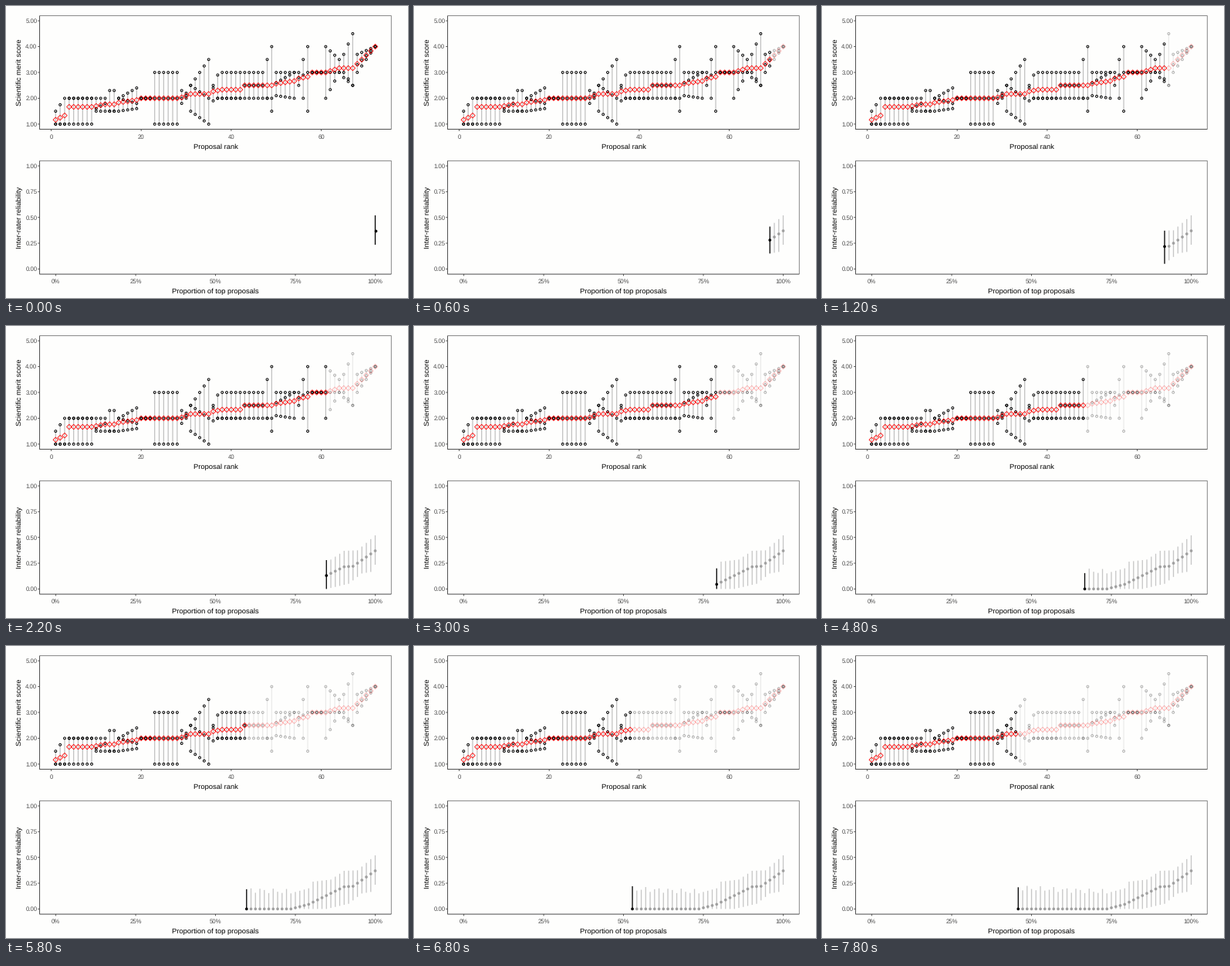
Write a matplotlib script that moves like this. It is 521 px wide and 378 px high and loops after 8000 ms.

```python
import numpy as np
import matplotlib.pyplot as plt
from matplotlib.animation import FuncAnimation
from matplotlib.collections import LineCollection

W, H, DPI = 521, 378, 100
PX = 72 / DPI                       # points per pixel
LEFT, RIGHT = 43.6, 499.3
STEPS, FADE = 40, 0.3
TICK, TITLE = 7.8, 9.35             # text sizes in pixels

plt.rcParams.update({"font.family": "Liberation Sans",
                     "text.hinting": "none"})


def run(count, first, last=None):
    """Score triples drifting evenly from first to last."""
    return np.linspace(first, first if last is None else last, count)


# Low, middle and high reviewer score of each proposal, in rank order.
scores = np.vstack([
    run(3, (1, 1, 1.5), (1, 1, 2)),
    run(6, (1, 2, 2)),
    run(3, (1.5, 1.6, 2), (1.5, 1.8, 2)),
    run(2, (1.5, 1.5, 2.3)),
    run(5, (1.5, 2, 2), (1.6, 1.8, 2.4)),
    run(3, (2, 2, 2)),
    run(6, (1, 2, 3)),
    run(2, (1.8, 2, 2.3), (2, 2.1, 2.2)),
    run(5, (1.5, 2.5, 2.5), (1, 2, 3.5)),
    run(2, (1.9, 2.4, 2.5), (2, 2, 2.9)),
    run(5, (2, 2, 3)),
    run(5, (2, 2.5, 3)),
    run(2, (2, 2, 3.5), (1.5, 2, 4)),
    run(5, (2.1, 2.6, 3), (2, 3, 3)),
    run(3, (2.5, 2.8, 3), (1.5, 3, 4)),
    run(3, (3, 3, 3)),
    run(4, (2, 3, 4), (3, 3, 3.5)),
    run(3, (2.8, 3, 3.7), (2.5, 2.5, 4.5)),
    run(5, (3, 3.3, 3.7), (4, 4, 4)),
])
count = len(scores)
ranks = np.arange(1, count + 1)

# Reliability falls to zero as the best-ranked proposals are dropped.
steps = np.arange(STEPS)
estimate = np.interp(steps, [0, 5, 7, 15, 19], [.37, .22, .215, .045, 0])
lower = np.interp(steps, [0, 1, 3, 6, 11], [.235, .165, .15, .05, 0])
upper = np.interp(steps, [0, 4, 7, 10, 14, 15, 18, 39],
                  [.52, .375, .37, .285, .265, .2, .165, .205])
ripple = .025 * np.cos(2 * np.pi * (steps - 20) / 2.8)
upper += np.where(steps > 18, ripple, 0)


def rank_x(rank):
    return 58.5 + 5.834 * rank


def score_y(score):
    return 152.9 - 33.45 * (score - 1)


def share_x(share):
    return 64.6 + 413.9 * share


def rel_y(value):
    return 340.4 - 133.4 * value


fig = plt.figure(figsize=(W / DPI, H / DPI), dpi=DPI, facecolor="#fefefd")
ax = fig.add_axes([0, 0, 1, 1])
ax.set_xlim(0, W)
ax.set_ylim(H, 0)
ax.axis("off")


def line(xs, ys, color, width=0.9):
    ax.plot(xs, ys, color=color, lw=width * PX, zorder=6, snap=False,
            solid_capstyle="butt")


def label(x, y, text, size, color="black", **kw):
    ax.text(x, y, text, fontsize=size * PX, color=color, va="baseline", **kw)


def panel(y0, y1, xticks, yticks, xtitle, ytitle):
    line([LEFT, RIGHT, RIGHT], [y0, y0, y1], "#7a7a7a")
    line([LEFT, LEFT, RIGHT], [y0, y1, y1], "#3a3a3a")
    for x, text in xticks:
        line([x, x], [y1, y1 + 2.3], "#444444")
        label(x, y1 + 12, text, TICK, "#4d4d4d", ha="center")
    for y, text in yticks:
        line([LEFT - 2.3, LEFT], [y, y], "#444444")
        label(LEFT - 3.2, y + 2.8, text, TICK, "#4d4d4d", ha="right")
    label((LEFT + RIGHT) / 2, y1 + 25.2, xtitle, TITLE, ha="center")
    label(20, (y0 + y1) / 2, ytitle, TITLE, ha="center",
          rotation=90, rotation_mode="anchor")


panel(12.6, 159.6,
      [(rank_x(r), str(r)) for r in (0, 20, 40, 60)],
      [(score_y(s), f"{s:.2f}") for s in range(1, 6)],
      "Proposal rank", "Scientific merit score")
panel(200.4, 347.1,
      [(share_x(q / 4), f"{25 * q}%") for q in range(5)],
      [(rel_y(q / 4), f"{q / 4:.2f}") for q in range(5)],
      "Proportion of top proposals", "Inter-rater reliability")


def verticals(xs, y0, y1):
    return [[(x, a), (x, b)] for x, a, b in zip(xs, y0, y1)]


def markers(xs, ys, size, shape, width):
    return ax.scatter(xs, ys, s=(size * PX) ** 2, marker=shape,
                      facecolors="none", linewidths=width * PX,
                      zorder=3, snap=False)


def stems(segments, width):
    return ax.add_collection(LineCollection(
        segments, linewidths=width * PX, capstyle="butt", zorder=2,
        snap=False))


rx = rank_x(ranks)
sx = share_x((count - steps) / count)
spans = stems(verticals(rx, score_y(scores[:, 0]), score_y(scores[:, 2])), 1.2)
dots = markers(np.repeat(rx, 3), score_y(scores.ravel()), 2.9, "o", 0.95)
means = markers(rx, score_y(scores.mean(axis=1)), 4.6, "D", 0.8)
bars = stems([], 1.3)
marks = markers([], [], 3.7, "o", 0)


def shade(rgb, alpha):
    return np.column_stack([np.tile(rgb, (len(alpha), 1)), alpha])


def draw(step):
    alpha = np.where(ranks <= count - step, 1.0, FADE)
    spans.set_color(shade((.75, .75, .75), alpha))
    dots.set_edgecolor(shade((0, 0, 0), np.repeat(alpha, 3)))
    means.set_edgecolor(shade((1, 0, 0), alpha))

    n = step + 1
    bars.set_segments(verticals(sx[:n], rel_y(lower[:n]), rel_y(upper[:n])))
    bars.set_color(["#c6c6c6"] * step + ["black"])
    marks.set_offsets(np.column_stack([sx[:n], rel_y(estimate[:n])]))
    marks.set_facecolor(["#a0a0a0"] * step + ["black"])
    return spans, dots, means, bars, marks


anim = FuncAnimation(fig, draw, frames=STEPS, interval=200,
                     init_func=lambda: draw(0), repeat=True, repeat_delay=0)
plt.show()
```
